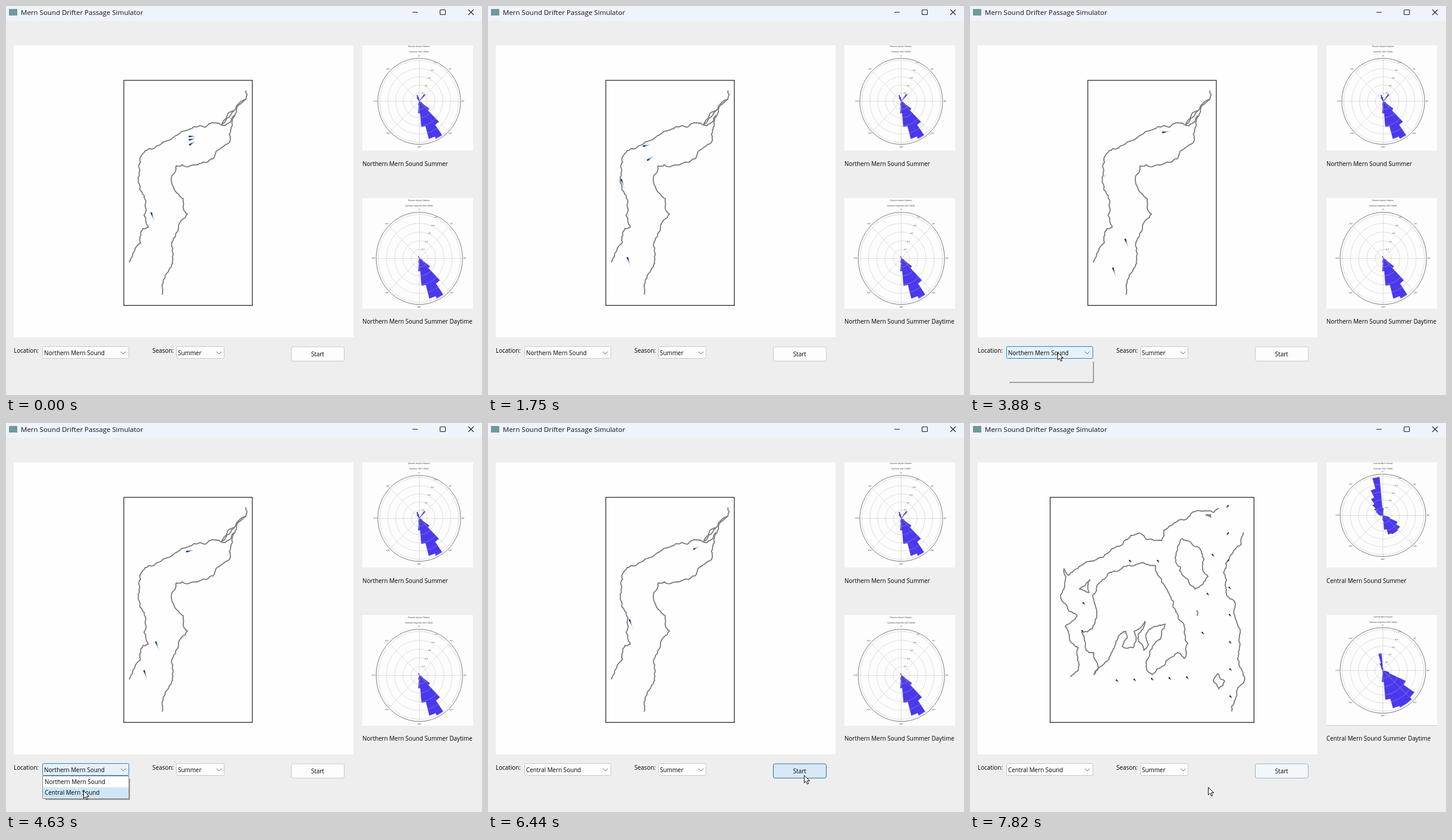
These frames come from a looping animation (800x654 px, 8 s). An HTML page with a canvas:

```html
<!DOCTYPE html>
<html lang="en">
<head>
<meta charset="utf-8">
<title>Drift simulator</title>
<style>
  html, body { margin: 0; width: 100%; height: 100%; overflow: hidden; background: #eee; }
  svg, canvas { position: absolute; left: 0; top: 0; width: 800px; height: 654px; }
  text { font-family: "Open Sans", "Noto Sans", sans-serif; font-size: 9.9px; fill: #000; }
  .title { font-size: 11.5px; fill: #111; }
  .coast { fill: none; stroke: #7a7a7a; stroke-width: 1.8; stroke-linejoin: round; }
  .frame { fill: none; stroke: #1c1c1c; stroke-width: 1.2; }
  .box { fill: #fdfdfd; stroke: #c9c9c9; }
  .glyph { fill: none; stroke: #222; stroke-width: 1.1; }
  .arrow { fill: none; stroke: #666; }
  .rose text { font-family: "DejaVu Sans", sans-serif; font-size: 3.2px; text-anchor: middle; fill: #222; }
  .rose .tick { font-size: 2.9px; }
  .grid { fill: none; stroke: #b5b5b5; stroke-width: .45; }
  .rim { fill: none; stroke: #444; stroke-width: .7; }
  .bar { fill: #4a38f0; stroke: #3527cf; stroke-width: .4; }
</style>
</head>
<body>
<svg viewBox="0 0 800 654">
  <rect width="800" height="654" fill="#eee"/>
  <rect width="800" height="25" fill="#eff3fb"/>
  <rect x="5" y="5" width="14" height="11" fill="#6f9a97"/>
  <text class="title" x="25" y="15">Mern Sound Drifter Passage Simulator</text>
  <path class="glyph" d="M683 10.5h9M777 6l9 9M786 6l-9 9"/>
  <rect class="glyph" x="729.5" y="6.5" width="9" height="8" rx="1"/>
  <rect x="13" y="66" width="571" height="491" fill="#fefefe"/>
  <rect x="599" y="66" width="186" height="177" fill="#fdfdfd"/>
  <rect x="599" y="323" width="186" height="186" fill="#fdfdfd"/>

  <g id="north"><rect class="frame" x="198" y="125" width="216" height="378.4"/></g>
  <g id="central">
    <rect class="frame" x="134.7" y="125" width="342.6" height="378.4"/>
    <path d="M599 508.5h186" stroke="#ccc"/>
  </g>
  <text id="name1" x="599" y="269"></text>
  <text id="name2" x="599" y="534"></text>

  <text x="13" y="583">Location:</text>
  <rect id="location" class="box" x="61.5" y="572.5" width="145" height="20" rx="2"/>
  <text id="place" x="64" y="587"></text>
  <path class="arrow" d="M193 581l4 4 4-4"/>
  <text x="246" y="583">Season:</text>
  <rect class="box" x="286.5" y="572.5" width="80" height="20" rx="2"/>
  <text x="289" y="587">Summer</text>
  <path class="arrow" d="M354 581l4 4 4-4"/>
  <rect id="start" class="box" x="479.5" y="573" width="89" height="24" rx="3"/>
  <text x="523.7" y="589" text-anchor="middle">Start</text>

  <g id="popup">
    <path d="M207.5 598V633M66 632.7H208" stroke="#8c8c8c" stroke-width="1.6"/>
    <g id="list">
      <rect x="61.5" y="593.5" width="145" height="38" fill="#fff" stroke="#8a8a8a"/>
      <rect id="mark" x="62" y="594" width="144" height="18" fill="#cde6f8"/>
      <text x="65" y="607">Northern Mern Sound</text>
      <text x="65" y="625">Central Mern Sound</text>
    </g>
  </g>
  <path id="cursor" d="M0 0V12.6L3 9.8 5.1 14.6 7.2 13.7 5.2 9.1H9.2Z" fill="#fff" stroke="#111"/>
</svg>
<canvas id="drift" width="800" height="654"></canvas>

<script>
const LOOP = 8;
const SWITCH = 6.75;   // seconds: second map appears
const FREEZE = 5.8;    // seconds: first run halts
const RELEASE = 7.55;  // seconds: second run begins
const $ = id => document.getElementById(id);
const north = $('north'), central = $('central');

let seed = 7;
const rand = () => (seed = (seed * 16807) % 2147483647) / 2147483647;

function add(parent, tag, attrs, text) {
  const el = document.createElementNS('http://www.w3.org/2000/svg', tag);
  for (const k in attrs) el.setAttribute(k, attrs[k]);
  if (text) el.textContent = text;
  parent.appendChild(el);
  return el;
}

// Splits a line in two with a random sideways shift until the pieces are short.
function fractal(a, b) {
  const dx = b[0] - a[0], dy = b[1] - a[1];
  if (Math.hypot(dx, dy) < 3.5) return [b];
  const s = (rand() - .5) * .3;
  const mid = [a[0] + dx / 2 - dy * s, a[1] + dy / 2 + dx * s];
  return [...fractal(a, mid), ...fractal(mid, b)];
}

function coast(parent, outline) {
  const p = outline.split(' ').map(s => s.split(',').map(Number));
  const line = p.slice(1).flatMap((b, i) => fractal(p[i], b));
  const d = [p[0], ...line].map(q => q.map(v => v.toFixed(1)).join(' ')).join('L');
  add(parent, 'path', { class: 'coast', d: 'M' + d });
}

coast(north, '403,142 403,157 390,165 378,183 362,200 341,198 334,204 316,203 289,216 262,231 234,243 226,254 222,288 235,330 239,372 230,374 226,397 216,412 207,431');
coast(north, '384,176 377,178 362,200 368,201 383,184');
coast(north, '403,157 388,170 380,202 375,230 364,237 348,257 325,265 286,269 278,288 298,324 305,350 290,372 278,402 280,424 262,485');

coast(central, '418,143 410,150 388,148 372,152 358,163 343,168 326,180 322,198 298,196 284,185 270,189 236,215 208,232 182,244 166,256 158,245 161,258 152,290 166,316 180,324 160,342 168,366 182,378 182,416 169,427');
coast(central, '250,248 288,235 312,240 322,268 342,300 346,318 360,340 366,370 360,396 348,386 326,408 306,423 296,410 302,384 328,338 303,346 296,362 300,372 292,382 282,362 294,333');
coast(central, '294,333 276,350 274,378 256,376 264,362 262,350 254,354 240,382 222,408 208,423 216,412 208,386 200,386 192,364 188,352 206,346 213,315 206,292 222,264 250,248');
coast(central, '202,263 184,279 200,285 202,263');
coast(central, '356,194 386,210 392,250 400,258 378,279 352,248 354,242 348,238 356,194');
coast(central, '416,421 428,434 418,447 409,432 416,421');
coast(central, '396,155 404,154 405,158 396,155');
coast(central, '381,315 383,318 382,324');
coast(central, '460,184 456,204 438,222 426,252 430,276 446,304 454,354 450,396 462,430 440,476 440,485');

// Length of a wind bar: each lobe falls off on either side of its direction.
const windLength = (lobes, deg) => lobes.reduce((sum, { dir, peak, left, right, power = 2 }) => {
  const d = (deg - dir + 540) % 360 - 180;
  return sum + peak * Math.exp(-Math.pow(Math.abs(d) / (d < 0 ? left : right), power));
}, 0);

function rose(parent, cx, cy, rx, ry, top, lines, lobes) {
  const g = add(parent, 'g', { class: 'rose' });
  const at = (deg, r) => {
    const a = deg * Math.PI / 180;
    return [cx + Math.sin(a) * rx * r, cy - Math.cos(a) * ry * r];
  };
  for (let a = 0; a < 360; a += 10) {
    const r = windLength(lobes, a);
    if (r > .03) add(g, 'path', { class: 'bar', d: `M${cx} ${cy}L${at(a - 5, r)}L${at(a + 5, r)}Z` });
  }
  for (let k = 1; k <= 5; k++) {
    const r = k / 5.25;
    add(g, 'ellipse', { class: 'grid', cx, cy, rx: rx * r, ry: ry * r });
    const [x, y] = at(22.5, r);
    add(g, 'text', { class: 'tick', x: x + 1.5, y: y - .2 }, (k / 5).toFixed(1));
  }
  for (let a = 0; a < 360; a += 45) {
    add(g, 'path', { class: 'grid', d: `M${cx} ${cy}L${at(a, 1)}` });
    const [x, y] = at(a, 1.06);
    add(g, 'text', { class: 'tick', x, y: y + 1 }, a + '°');
  }
  add(g, 'ellipse', { class: 'rim', cx, cy, rx, ry });
  lines.forEach((s, i) => add(g, 'text', { x: 694, y: top + i * 8.4 }, s));
}

const airport = 'Tolverin Airport Station', area = 'Central Mern Sound';
const years = 'Summer 2017-2020', daytime = 'Summer Daytime 2017-2020';
const outflow = { dir: 153, peak: .98, left: 21, right: 24 };
rose(north, 694.5, 160.3, 69.6, 72.3, 69.3, [airport, years], [
  outflow,
  { dir: 42, peak: .22, left: 9, right: 6 },
  { dir: -20, peak: .15, left: 16, right: 14 }
]);
rose(north, 694.7, 424.3, 72.6, 77.5, 328.3, [airport, daytime], [
  outflow,
  { dir: -20, peak: .05, left: 16, right: 14 }
]);
rose(central, 694, 155.3, 72, 69.3, 69.3, [area, years], [
  { dir: -10, peak: .93, left: 30, right: 6, power: 1 },
  { dir: 145, peak: .5, left: 34, right: 32, power: 4 }
]);
rose(central, 694, 416, 72, 72, 327.3, [area, daytime], [
  { dir: -10, peak: .4, left: 12, right: 5, power: 1 },
  { dir: 145, peak: .95, left: 30, right: 33, power: 4 }
]);

const mix = (a, b, f) => a.map((v, i) => v + (b[i] - v) * f);

// Straight drift from a to b, stranded on arrival.
function drifter(born, a, b, speed, size) {
  const span = Math.hypot(b[0] - a[0], b[1] - a[1]) / speed;
  return { born, end: born + span, size, at: t => mix(a, b, Math.min(1, (t - born) / span)) };
}

const northRun = [
  { from: [317, 219], to: [284, 220], births: [-.32] },
  { from: [317, 223], to: [242, 240], births: [-.32] },
  { from: [317, 228], to: [226, 286], births: [-.35] },
  { from: [250, 364], to: [223, 289], births: [-.5] },
  { from: [246, 458], to: [226, 398], births: [-2.1, .67, 3.35] },
  { from: [357, 205], to: [344, 198], births: [.5, 3, 4.75] },
  { from: [367, 205], to: [282, 220], births: [2.3] },
  { from: [269, 414], to: [236, 326], births: [3.2] },
  { from: [368, 201], to: [346, 212], births: [4.85] }
].flatMap(({ from, to, births }) =>
  births.map(born => drifter(born, from, to, from[1] > 290 ? 34 : 27.5, 1.1)));

// Evenly spaced releases along the channels of the second map.
const channels = [
  { from: [434, 139], to: [437, 459], count: 8 },
  { from: [407, 221], to: [390, 352], count: 3 },
  { from: [246, 432], to: [364, 427], count: 5 },
  { from: [190, 302], to: [188, 349], count: 2 },
  { from: [268, 231], to: [315, 231], count: 2 }
];
const centralRun = channels.flatMap(({ from, to, count }) =>
  Array.from({ length: count }, (_, i) => {
    const [x, y] = mix(from, to, i / (count - 1));
    const dx = x > 415 && y < 235 ? 3 : -3;
    return drifter(RELEASE, [x - dx, y + 3], [x + dx, y - 3], 15, .9);
  }));

const ctx = $('drift').getContext('2d');

// Fading trail behind a drifter; a stranded one loses its head first.
function trail({ born, end, size, at }, t) {
  const steps = 36;
  for (let k = steps; k >= 0; k--) {
    const tk = t - k * .026;
    if (tk < born || tk > end + .04) continue;
    const f = k / steps, m = Math.min(1, f * 2.6);
    const [x, y] = at(tk);
    ctx.fillStyle = `rgba(${mix([8, 48, 107], [107, 174, 214], m)},${(1 - f) ** 4})`;
    ctx.beginPath();
    ctx.arc(x, y, size * (1 - f) ** .8 + .15, 0, 7);
    ctx.fill();
  }
}

const cursorKeys = [
  [3, 330, 660], [3.5, 150, 590], [3.88, 147, 582], [4.45, 130, 618], [4.72, 130, 618],
  [5.38, 529, 597], [6.07, 531, 592], [SWITCH, 531, 592], [7.82, 400, 612]
];

function cursorAt(t) {
  const i = cursorKeys.findIndex(k => k[0] > t);
  if (i < 1) return cursorKeys.at(i).slice(1);
  const [a, b] = cursorKeys.slice(i - 1, i + 1);
  return mix(a, b, (t - a[0]) / (b[0] - a[0])).slice(1);
}

const show = (id, on) => { $(id).style.display = on ? '' : 'none'; };
const paint = (id, fill, stroke) => { $(id).style.fill = fill; $(id).style.stroke = stroke; };

function draw(t) {
  const second = t >= SWITCH;
  show('north', !second);
  show('central', second);
  const region = (second ? 'Central' : 'Northern') + ' Mern Sound Summer';
  $('name1').textContent = region;
  $('name2').textContent = region + ' Daytime';
  $('place').textContent = (t < 4.7 ? 'Northern' : 'Central') + ' Mern Sound';

  const [x, y] = cursorAt(t);
  $('cursor').setAttribute('transform', `translate(${x + .5} ${y + .5})`);
  show('cursor', t > 3);
  show('popup', t > 3.84 && t < 4.7);
  show('list', t > 3.94);
  $('mark').setAttribute('y', y > 612 ? 612.5 : 594);

  if (t > 3.5 && t < 4.7) paint('location', '#e5f1fb', '#2a82c9');
  else paint('location', '', '');
  if (second) paint('start', '#f4f7fa', '#94b4cc');
  else if (t > FREEZE) paint('start', '#d8e8f6', '#2d6e9e');
  else paint('start', '', '');

  ctx.clearRect(0, 0, 800, 654);
  const now = second ? t : Math.min(t, FREEZE);
  (second ? centralRun : northRun).forEach(d => trail(d, now));
}

const began = performance.now();
function tick() {
  draw((performance.now() - began) / 1000 % LOOP);
  requestAnimationFrame(tick);
}
tick();
</script>
</body>
</html>
```
